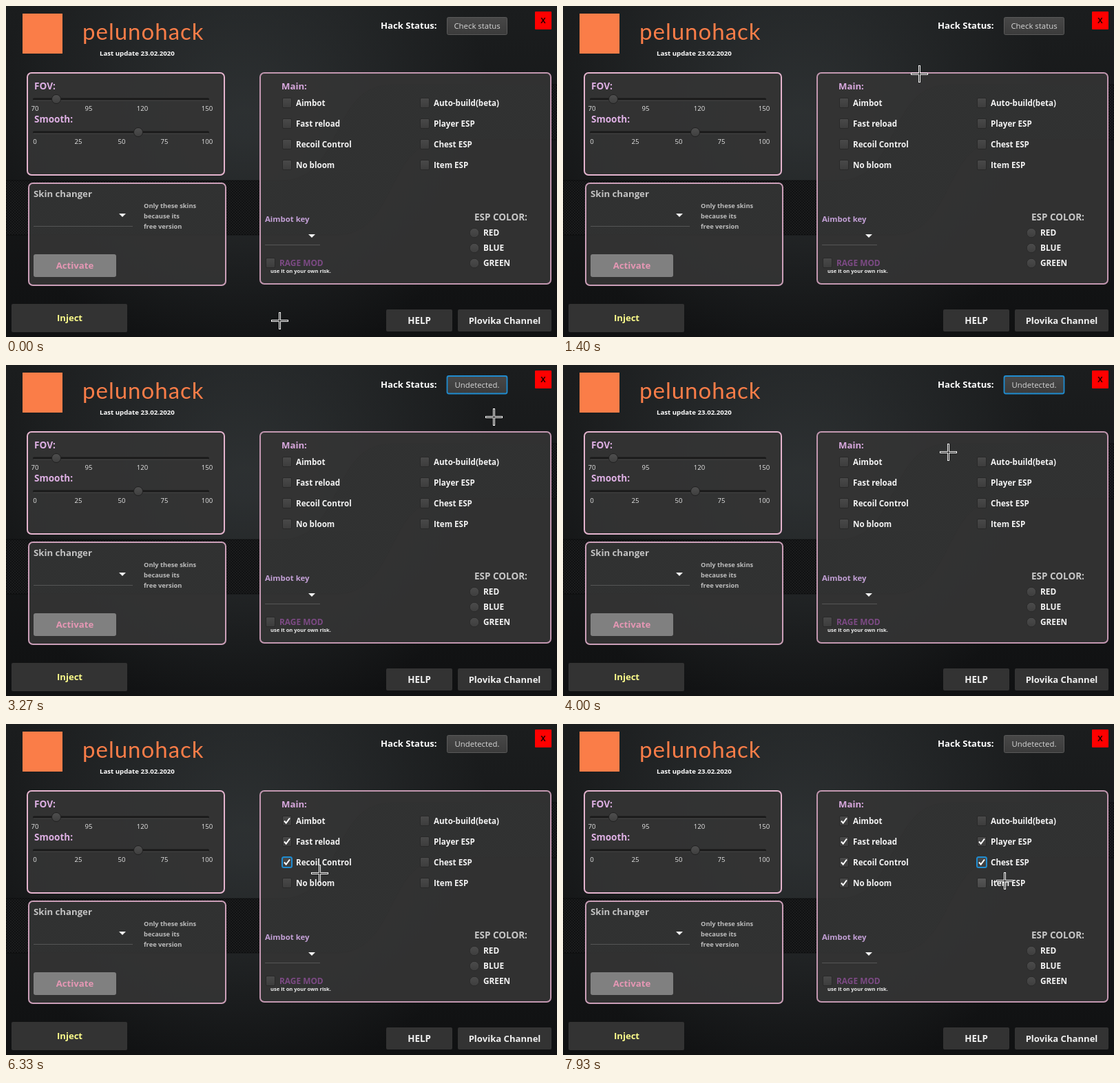
An HTML page with a canvas for the animation above (8000 ms loop, 800 by 480 pixels).

```html
<!DOCTYPE html>
<html lang="en">
<head>
<meta charset="utf-8">
<title>Control panel</title>
<style>
html, body { margin: 0; width: 100%; height: 100%; overflow: hidden; background: #141516; }
canvas { display: block; width: 800px; height: 480px; }
</style>
</head>
<body>
<canvas id="stage" width="800" height="480"></canvas>
<script>
const W = 800, H = 480, LOOP = 8000, TICK = 1000 / 15;
const SANS = '"Open Sans", "Noto Sans", sans-serif';
const BLUE = '#1f8cd0';
const stage = document.getElementById('stage').getContext('2d');
const still = document.createElement('canvas');
still.width = W;
still.height = H;
let c = still.getContext('2d');

// Pointer path: tick, x, y
const path = [
  [5, 397, 456], [8, 362, 416], [11, 318, 338], [14, 298, 268], [16, 304, 222],
  [18, 331, 194], [19, 385, 168], [21, 517, 98], [23, 610, 58], [25, 672, 37],
  [28, 707, 27], [36, 707, 27], [38, 714, 45], [40, 721, 68], [47, 721, 68],
  [51, 694, 82], [55, 630, 105], [60, 559, 126], [61, 538, 131], [63, 488, 144],
  [64, 475, 146], [71, 475, 146], [73, 467, 149], [75, 467, 149], [78, 464, 151],
  [85, 464, 151], [88, 459, 174], [90, 458, 178], [92, 456, 200], [94, 455, 205],
  [96, 454, 226], [97, 454, 228], [98, 468, 230], [100, 570, 196], [102, 656, 160],
  [105, 656, 160], [107, 654, 165], [110, 654, 165], [113, 648, 194], [116, 646, 199],
  [118, 641, 222], [119, 641, 227]
];

// label, x, y, focus tick, tick when checked, tick when focus leaves
const boxes = [
  ['Aimbot', 401, 133, 83, 85, 89],
  ['Fast reload', 401, 163, 89, 90, 92],
  ['Recoil Control', 401, 193, 92, 93, 96],
  ['No bloom', 401, 223, 96, 97, 107],
  ['Auto-build(beta)', 601, 133],
  ['Player ESP', 601, 163, 107, 109, 114],
  ['Chest ESP', 601, 193, 114, 115, 121],
  ['Item ESP', 601, 223]
];

function text(s, x, y, size, color, { weight = 700, align = 'left', family = SANS } = {}) {
  c.font = `${weight} ${size}px ${family}`;
  c.textAlign = align;
  c.fillStyle = color;
  c.fillText(s, x, y);
}

function rect(x, y, w, h, r, fill, stroke, line = 1) {
  c.beginPath();
  c.roundRect(x, y, w, h, r);
  if (fill) { c.fillStyle = fill; c.fill(); }
  if (stroke) { c.strokeStyle = stroke; c.lineWidth = line; c.stroke(); }
}

function shade(y, h, top, bottom) {
  const g = c.createLinearGradient(0, y, 0, y + h);
  g.addColorStop(0, top);
  g.addColorStop(1, bottom);
  return g;
}

function disc(x, y, r, fill, stroke) {
  c.beginPath();
  c.arc(x, y, r, 0, Math.PI * 2);
  c.fillStyle = fill;
  c.fill();
  if (stroke) { c.strokeStyle = stroke; c.lineWidth = 1; c.stroke(); }
}

function weave() {
  const p = document.createElement('canvas');
  p.width = p.height = 4;
  const g = p.getContext('2d');
  g.fillStyle = '#1b1c1d';
  g.fillRect(0, 0, 4, 4);
  g.fillStyle = '#101112';
  g.fillRect(0, 0, 2, 2);
  g.fillRect(2, 2, 2, 2);
  return c.createPattern(p, 'repeat');
}

function backdrop() {
  c.fillStyle = shade(0, H, '#1b1d1e', '#101112');
  c.fillRect(0, 0, W, H);
  let g = c.createRadialGradient(345, 170, 20, 345, 170, 360);
  g.addColorStop(0, 'rgba(70,76,78,.45)');
  g.addColorStop(1, 'rgba(70,76,78,0)');
  c.fillStyle = g;
  c.fillRect(0, 0, W, H);
  c.beginPath();
  c.moveTo(0, 253);
  c.lineTo(400, 253);
  c.bezierCurveTo(490, 253, 470, 114, 560, 114);
  c.lineTo(W, 114);
  c.lineTo(W, 194);
  c.lineTo(640, 194);
  c.bezierCurveTo(550, 194, 570, 332, 480, 332);
  c.lineTo(0, 332);
  c.closePath();
  c.fillStyle = weave();
  c.fill();
  c.strokeStyle = 'rgba(0,0,0,.45)';
  c.lineWidth = 1;
  c.stroke();
}

function slider(y, knob, marks) {
  rect(39, y - 1.5, 256, 3, 1.5, '#191919');
  c.fillStyle = '#444';
  c.fillRect(40, y + 1.5, 254, 1);
  disc(knob, y, 6.5, shade(y - 7, 14, '#505050', '#3e3e3e'), '#202020');
  for (const [s, x] of marks) {
    text(s, x, y + 17, 9.6, '#e8e8e8', { weight: 400, align: 'center' });
  }
}

function combo(x, y, left, right, line) {
  c.beginPath();
  c.moveTo(x - 5, y);
  c.lineTo(x + 5, y);
  c.lineTo(x, y + 5);
  c.fillStyle = '#f2f2f2';
  c.fill();
  c.fillStyle = '#555';
  c.fillRect(left, line, right - left, 1);
}

function checkbox(x, y, state = {}) {
  const fill = state.hover ? shade(y, 14, '#585858', '#484848') : shade(y, 14, '#4a4a4a', '#3d3d3d');
  rect(x + .5, y + .5, 13, 14, 1.5, fill, '#292929');
  if (state.focus) rect(x, y, 14, 15, 2.5, null, BLUE, 2);
  if (state.checked) {
    c.beginPath();
    c.moveTo(x + 3, y + 7.5);
    c.lineTo(x + 5.7, y + 10.7);
    c.lineTo(x + 11, y + 3.5);
    c.strokeStyle = '#fff';
    c.lineWidth = 2;
    c.stroke();
  }
}

function drawStill() {
  backdrop();
  rect(24, 11, 58, 58, 0, '#fa7d48');
  c.letterSpacing = '1px';
  text('pelunohack', 111, 49, 33, '#fa7d48', { weight: 400, family: 'Lato, sans-serif' });
  c.letterSpacing = '0px';
  text('Last update 23.02.2020', 136, 72, 9.65, '#fff');
  text('Hack Status:', 544, 33, 13.1, '#fff');
  rect(768, 8, 24, 26, 1, '#f00');
  text('X', 780, 25, 11, '#200', { align: 'center' });

  const glass = 'rgba(52,52,52,.91)';
  rect(31, 97, 286, 148, 6, glass, '#e3b3cd', 2);
  rect(33, 257, 286, 148, 6, glass, '#cb9fb8', 2);
  rect(369, 97, 422, 306, 6, glass, '#c297b0', 2);

  text('FOV:', 41, 121, 13.6, '#deb0e4');
  slider(135, 73, [['70', 42], ['95', 120], ['120', 198], ['150', 292]]);
  text('Smooth:', 41, 169, 13.5, '#deb0e4');
  slider(183, 192, [['0', 42], ['25', 105], ['50', 168], ['75', 230], ['100', 292]]);

  text('Skin changer', 40, 277, 13.2, '#c3c3c3');
  combo(169, 301, 40, 184, 319);
  ['Only these skins', 'because its', 'free version'].forEach((s, i) =>
    text(s, 200, 293 + i * 15, 9.3, '#bdbdbd'));
  rect(40, 360, 120, 33, 3, '#808080');
  text('Activate', 100, 381, 13.2, '#e597b4', { align: 'center' });

  text('Main:', 400, 121, 13.2, '#d8a8de');
  for (const [label, x, y] of boxes) text(label, x + 20, y + 12, 11.6, '#f4f4f4');
  text('Aimbot key', 376, 313, 11.4, '#c3a0d6');
  combo(444, 331, 376, 456, 346);
  checkbox(377, 365);
  text('RAGE MOD', 397, 377, 11.9, '#7c4a84');
  text('use it on your own risk.', 384, 387, 7.55, '#eee');
  text('ESP COLOR:', 680, 311, 13.5, '#c6c6c6');
  ['RED', 'BLUE', 'GREEN'].forEach((s, i) => {
    const y = 329 + i * 22;
    disc(680, y, 6.8, shade(y - 7, 14, '#4c4c4c', '#3e3e3e'), '#2b2b2b');
    text(s, 693, y + 4, 11.8, '#f4f4f4');
  });

  rect(8, 432, 168, 41, 2, '#333');
  text('Inject', 92.5, 457, 13.1, '#ffff8c', { align: 'center' });
  rect(552, 440, 96, 32, 2, '#333');
  text('HELP', 600, 461, 13.4, '#f0f0f0', { align: 'center' });
  rect(656, 440, 136, 32, 2, '#333');
  text('Plovika Channel', 724, 461, 13.1, '#f0f0f0', { align: 'center' });
}

function pointerAt(k) {
  if (k <= path[0][0]) return path[0].slice(1);
  const i = path.findIndex(p => p[0] >= k);
  const [t0, x0, y0] = path[i - 1], [t1, x1, y1] = path[i];
  const u = (k - t0) / (t1 - t0);
  return [Math.round(x0 + (x1 - x0) * u), Math.round(y0 + (y1 - y0) * u)];
}

function statusButton(k, hover) {
  const focus = k >= 31 && k < 83;
  const label = k < 32 ? 'Check status' : k < 38 ? 'checking...' : 'Undetected.';
  const fill = hover ? shade(16, 26, '#505050', '#434343') : shade(16, 26, '#484848', '#3b3b3b');
  rect(640.5, 16.5, 87, 25, 2, fill, hover ? '#666' : '#5a5a5a');
  if (focus) rect(640.5, 16, 87, 25.5, 2.5, null, BLUE, 1.8);
  text(label, 684, 33, 11.4, '#d6d6d6', { weight: 400, align: 'center' });
}

function spinner(k) {
  if (k < 34 || k > 38) return;
  const n = 1 + (k - 34) * 2;
  for (let i = 0; i < n; i++) {
    c.save();
    c.translate(190, 374.5);
    c.rotate(i * Math.PI / 6);
    rect(-2.2, -13, 4.6, 3, 1, '#3f7fe0');
    c.restore();
  }
}

function pointer(x, y) {
  c.fillStyle = '#fff';
  c.fillRect(x - 12, y - 1, 25, 3);
  c.fillRect(x - 1, y - 12, 3, 25);
  c.fillStyle = '#111';
  c.fillRect(x - 11, y, 23, 1);
  c.fillRect(x, y - 11, 1, 23);
}

function draw(ms) {
  const k = Math.min(119, Math.floor((ms + 4) / TICK));
  const [px, py] = pointerAt(k);
  const over = (x, y, w, h) => px >= x && px < x + w && py >= y && py < y + h;
  c.drawImage(still, 0, 0);
  statusButton(k, over(640, 16, 88, 26));
  for (const [label, x, y, press, check, leave] of boxes) {
    checkbox(x, y, {
      hover: over(x, y - 3, 20 + label.length * 6, 21),
      focus: k >= press && k < leave,
      checked: k >= check
    });
    // Labels stay above the box highlight.
  }
  spinner(k);
  pointer(px, py);
}

drawStill();
c = stage;
const start = performance.now();
function frame() {
  draw((performance.now() - start) % LOOP);
  requestAnimationFrame(frame);
}
draw(0);
requestAnimationFrame(frame);
</script>
</body>
</html>
```
